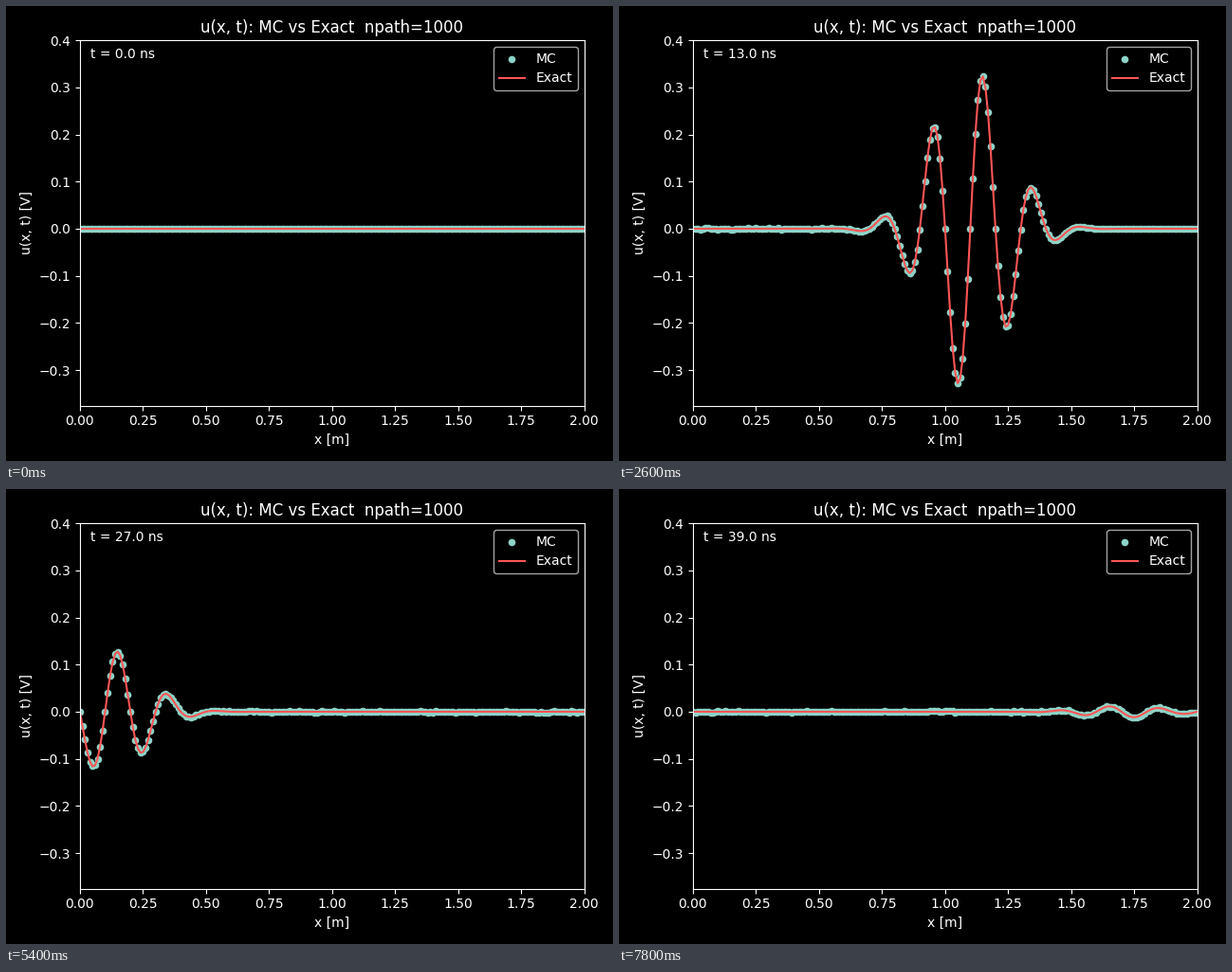
A matplotlib script that plays this animation: 640x480 px, repeating every 8000 ms.

```python
import numpy as np
import matplotlib.pyplot as plt
from matplotlib.animation import FuncAnimation

plt.style.use("dark_background")

FRAMES = 40          # one frame per nanosecond
LENGTH = 2.0         # line length, m
SPEED = 0.2          # m/ns
DELAY = 7.5          # pulse centre, ns
SIGMA = 0.75         # pulse width, ns
AMP = 0.4            # launched amplitude, V
LOSS = 0.136         # attenuation, 1/m
R_LOAD, R_SRC = -0.6, 0.2
NOISE = 0.0008       # sampling error, V

x = np.linspace(0, LENGTH, 201)


def pulse(tau):
    return -np.sin(2 * np.pi * tau) * np.exp(-tau**2 / (2 * SIGMA**2))


def travelled(t, dist):
    """Lossy pulse after it has covered the given distance."""
    return AMP * np.exp(-LOSS * dist) * pulse(t - DELAY - dist / SPEED)


def exact(t):
    u = np.zeros_like(x)
    for n in range(3):
        gain = (R_LOAD * R_SRC) ** n
        trip = 2 * LENGTH * n
        u += gain * travelled(t, trip + x)
        u += gain * R_LOAD * travelled(t, trip + 2 * LENGTH - x)
    return u


def sampled(t):
    """Exact solution plus random error behind the wave front."""
    rng = np.random.default_rng(100 + t)
    reached = x < SPEED * (t - DELAY + 2 * SIGMA)
    return exact(t) + NOISE * rng.standard_normal(x.size) * reached * (x > 0)


waves = np.array([exact(t) for t in range(FRAMES)])

fig, ax = plt.subplots(figsize=(6.4, 4.8), dpi=100)
dots = ax.scatter(x, waves[0], s=20, color="#8dd3c7", label="MC")
line, = ax.plot(x, waves[0], color="#ff5555", lw=1.5, label="Exact")
clock = ax.text(0.02, 0.95, "", transform=ax.transAxes)
ax.set_xlim(0, LENGTH)
ax.set_ylim(waves.min(), waves.max())
ax.set_xlabel("x [m]")
ax.set_ylabel("u(x, t) [V]")
ax.set_title("u(x, t): MC vs Exact  npath=1000")
ax.legend(loc="upper right")
fig.tight_layout()
fig.subplots_adjust(top=0.925)


def update(t):
    dots.set_offsets(np.column_stack([x, sampled(t)]))
    line.set_ydata(waves[t])
    clock.set_text(f"t = {t:.1f} ns")
    return dots, line, clock


anim = FuncAnimation(fig, update, frames=FRAMES, interval=200,
                     repeat=True, repeat_delay=0)
plt.show()
```
